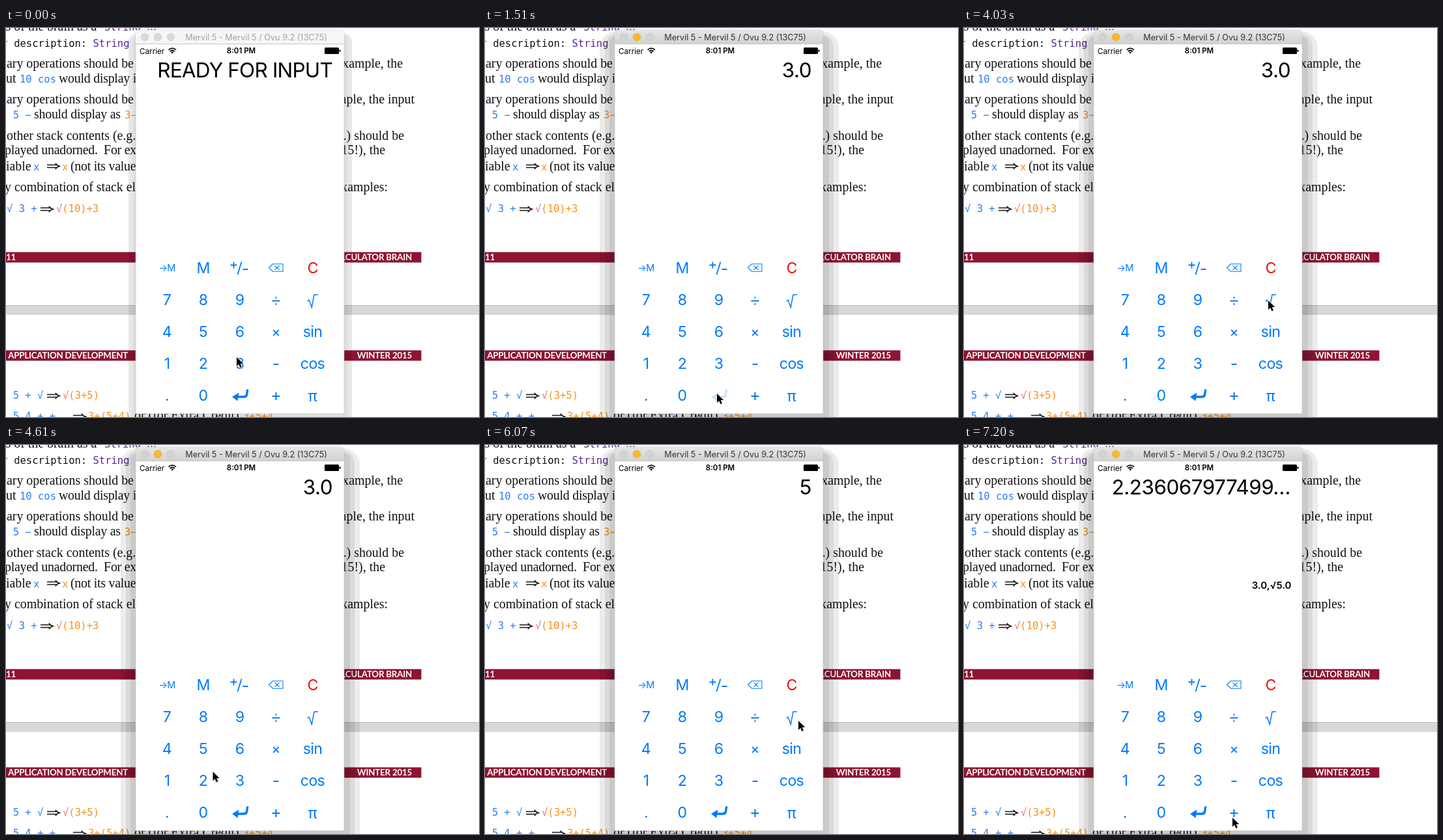
Recreate the animation shown at these times as an HTML page. Size 726 by 598 pixels, loop 8 s.

```html
<!DOCTYPE html>
<html lang="en">
<head>
<meta charset="utf-8">
<title>Calculator demo</title>
<style>
html, body { margin: 0; width: 100%; height: 100%; overflow: hidden; background: #fff; }
svg { display: block; width: 726px; height: 598px; }
text { white-space: pre; }

.page { font: 19.9px "Liberation Serif", serif; fill: #111; }
.code { font: 15.5px "DejaVu Sans Mono", monospace; }
.blue { fill: #2f7bf6; }
.orange { fill: #fb9017; }
.salmon { fill: #f0705a; }
.type { fill: #5c2699; }
.key { fill: #aa2b95; }
.end { text-anchor: end; }
.tight { letter-spacing: -.25px; }
.bar { fill: #8e1432; }
.head { font: 700 13.3px Lato, sans-serif; fill: #fff; letter-spacing: -.2px; }

.ui { font-family: Inter, sans-serif; }
.title { font-size: 12.7px; text-anchor: middle; }
.big { font-size: 31.5px; letter-spacing: -.55px; text-anchor: end; }
.keys { font-size: 23.2px; letter-spacing: -.7px; text-anchor: middle; fill: #007aff; }
.line { fill: none; stroke: #007aff; }

/* one loop is 8 s, so 1% is 80 ms */
.anim { animation: 8s step-end infinite; }
.idle, .t1 { opacity: 1; }
.live, .t2, .t3, .t4, .t5 { opacity: 0; }
.idle { animation-name: idle; }
.live { animation-name: live; }
@keyframes idle { 0% { opacity: 1 } 9%, 100% { opacity: 0 } }
@keyframes live { 0% { opacity: 0 } 9%, 100% { opacity: 1 } }

.t1 { animation-name: t1; letter-spacing: -.8px; }
.t2 { animation-name: t2; }
.t3 { animation-name: t3; }
.t4 { animation-name: t4; }
.t5 { animation-name: t5; }
@keyframes t1 { 0% { opacity: 1 } 10.5%, 100% { opacity: 0 } }
@keyframes t2 { 0% { opacity: 0 } 10.5% { opacity: 1 } 18.125%, 100% { opacity: 0 } }
@keyframes t3 { 0% { opacity: 0 } 18.125% { opacity: 1 } 65.125%, 100% { opacity: 0 } }
@keyframes t4 { 0% { opacity: 0 } 65.125% { opacity: 1 } 79.625%, 100% { opacity: 0 } }
@keyframes t5 { 0% { opacity: 0 } 79.625%, 100% { opacity: 1 } }

/* a pressed key dims at once and fades back after release */
.three { animation-name: three; }
.enter { animation-name: enter; }
.five { animation-name: five; }
.root { animation-name: root; }
@keyframes three {
  0% { opacity: 1 }
  9% { opacity: .2 }
  10.5% { opacity: .2; animation-timing-function: steps(7, start) }
  15.75%, 100% { opacity: 1 }
}
@keyframes enter {
  0% { opacity: 1 }
  17.375% { opacity: .2 }
  19.625% { opacity: .2; animation-timing-function: steps(7, start) }
  24.875%, 100% { opacity: 1 }
}
@keyframes five {
  0% { opacity: 1 }
  62.125% { opacity: .2 }
  65.125% { opacity: .2; animation-timing-function: steps(7, start) }
  70.375%, 100% { opacity: 1 }
}
@keyframes root {
  0% { opacity: 1 }
  78.125% { opacity: .2 }
  79.625% { opacity: .2; animation-timing-function: steps(6, start) }
  84.125%, 100% { opacity: 1 }
}

.cursor { animation-name: cursor; }
@keyframes cursor {
  0% { transform: translate(353px, 505px) }
  .75% { transform: translate(353px, 505px); animation-timing-function: steps(5, start) }
  5.44% { transform: translate(351px, 525px) }
  12% { transform: translate(351px, 525px); animation-timing-function: steps(5, start) }
  15.875% { transform: translate(355px, 561px) }
  19.625% { transform: translate(355px, 561px); animation-timing-function: steps(2, start) }
  21.125% { transform: translate(359px, 566px); animation-timing-function: steps(4, start) }
  24.125% { transform: translate(405px, 500px); animation-timing-function: steps(5, start) }
  27.875% { transform: translate(467px, 419px); animation-timing-function: steps(4, start) }
  30.875% { transform: translate(477px, 409px) }
  50.375% { transform: translate(466px, 418px) }
  51.125% { transform: translate(466px, 418px); animation-timing-function: steps(5, start) }
  54.875% { transform: translate(392px, 478px); animation-timing-function: steps(4, start) }
  57.625% { transform: translate(322px, 512px); animation-timing-function: steps(4, start) }
  60.625% { transform: translate(300px, 469px); animation-timing-function: steps(2, start) }
  62.125% { transform: translate(302px, 466px) }
  67.375% { transform: translate(302px, 466px); animation-timing-function: steps(4, start) }
  70.375% { transform: translate(362px, 482px); animation-timing-function: steps(6, start) }
  75.125% { transform: translate(483px, 431px); animation-timing-function: steps(2, start) }
  76.625% { transform: translate(480px, 423px); animation-timing-function: steps(2, start) }
  78.125% { transform: translate(470px, 420px) }
  81.125% { transform: translate(470px, 420px); animation-timing-function: steps(6, start) }
  85.625% { transform: translate(398px, 559px); animation-timing-function: steps(3, start) }
  87.7% { transform: translate(409px, 570px) }
  89.25% { transform: translate(409px, 570px); animation-timing-function: steps(2, start) }
  90.75%, 100% { transform: translate(411px, 572px) }
}
</style>
</head>
<body>
<svg viewBox="0 0 726 598" xmlns="http://www.w3.org/2000/svg">
  <defs>
    <path id="implies" d="M0-2.4H15.5M0 1.4H15.5M12.8-5Q15-1.6 19-.5Q15 .6 12.8 4" fill="none" stroke="#111" stroke-width="1.5"/>
    <linearGradient id="chrome" x2="0" y2="1">
      <stop stop-color="#e6e6e6"/>
      <stop offset="1" stop-color="#d1d1d1"/>
    </linearGradient>
  </defs>

  <!-- document behind the window -->
  <rect width="726" height="598" fill="#fff"/>
  <path d="M0 426H726V441H0Z" fill="#d8d8d8"/>
  <path d="M0 426.5H726" stroke="#b8b8b8"/>
  <g class="page">
    <text x="-6" y="4">ts of the brain as a <tspan x="151" class="code type">String</tspan><tspan x="211"> ...</tspan></text>
    <text x="-6.5" y="29" class="code"><tspan class="key">r</tspan> description: <tspan class="type">String</tspan></text>
    <text x="-9" y="61">nary operations should be displayed</text>
    <text x="609" y="61" class="end">example, the</text>
    <text x="0" y="84">ut <tspan x="21" class="code blue">10 cos</tspan><tspan x="81" class="tight">would display in</tspan></text>
    <text x="-9" y="116">nary operations should be displayed</text>
    <text x="627" y="116" class="end">example, the input</text>
    <text y="139"><tspan x="-8" class="code blue">3 5 −</tspan><tspan x="43" class="tight">should display as</tspan><tspan x="182" class="code orange">3−5</tspan></text>
    <text x="1" y="172">other stack contents (e.g. values</text>
    <text x="611" y="172" class="end">.) should be</text>
    <text x="-2" y="194" class="tight">played unadorned.  For example</text>
    <text x="582" y="194" class="end">15!), the</text>
    <text x="0" y="219">iable <tspan x="42" class="code blue">x</tspan><tspan x="86" class="code orange">x</tspan><tspan x="99" class="tight">(not its value</tspan></text>
    <use href="#implies" x="63" y="213"/>
    <text x="-2" y="251">y combination of stack elements</text>
    <text x="586" y="251" class="end">examples:</text>
    <text y="283" class="code"><tspan x="1" class="blue">√ 3 +</tspan><tspan x="77" class="salmon">√</tspan><tspan class="orange">(10)+3</tspan></text>
    <use href="#implies" x="53" y="279"/>
    <text y="570" class="code"><tspan x="-8" class="blue">3 5 + √</tspan><tspan x="87" class="salmon">√</tspan><tspan class="orange">(3+5)</tspan></text>
    <use href="#implies" x="63" y="566"/>
    <text y="602"><tspan x="-8" class="code blue">3 5 4 + +</tspan><tspan x="126" class="code orange">3+(5+4)</tspan><tspan x="197">or (for Extra Credit)</tspan><tspan x="364" class="code orange">3+5+4</tspan></text>
    <use href="#implies" x="103" y="598"/>
  </g>
  <path class="bar" d="M0 344.5H637.5V360.5H0ZM0 495.5H637.5V511.5H0Z"/>
  <g class="head">
    <text x="0" y="357">11</text>
    <text x="623" y="357" class="end">CALCULATOR BRAIN</text>
    <text x="187" y="508" class="end">U APPLICATION DEVELOPMENT</text>
    <text x="623" y="508" class="end">WINTER 2015</text>
  </g>

  <!-- window shadow -->
  <g class="anim idle" fill="#000" fill-opacity=".09">
    <rect x="188" y="8" width="343" height="640" rx="14"/>
    <rect x="194" y="12" width="331" height="640" rx="8" fill-opacity=".04"/>
  </g>
  <g class="anim live" fill="#000" fill-opacity=".075">
    <rect x="176" y="5" width="367" height="640" rx="26"/>
    <rect x="184" y="9" width="351" height="640" rx="19"/>
    <rect x="191" y="12" width="337" height="640" rx="11"/>
  </g>

  <!-- window -->
  <path d="M199 593V8Q199 3 204 3H514Q519 3 519 8V593Z" fill="#fff" stroke="#b8b8b8" stroke-width=".6"/>
  <g class="ui">
    <g class="anim idle">
      <path d="M199 25V8Q199 3 204 3H514Q519 3 519 8V25Z" fill="#f6f6f6"/>
      <g fill="#dadada" stroke="#cacaca" stroke-width=".7">
        <circle cx="213" cy="14" r="5.7"/><circle cx="233" cy="14" r="5.7"/><circle cx="253" cy="14" r="5.7"/>
      </g>
      <text class="title" x="384" y="19" fill="#a2a2a2">Mervil 5 - Mervil 5 / Ovu 9.2 (13C75)</text>
    </g>
    <g class="anim live">
      <path d="M199 25V8Q199 3 204 3H514Q519 3 519 8V25Z" fill="url(#chrome)"/>
      <g fill="#d3d3d3" stroke="#c2c2c2" stroke-width=".7">
        <circle cx="213" cy="14" r="5.7"/><circle cx="253" cy="14" r="5.7"/>
        <circle cx="233" cy="14" r="5.7" fill="#fdb924" stroke="#e0a12a"/>
      </g>
      <text class="title" x="384" y="19" fill="#333">Mervil 5 - Mervil 5 / Ovu 9.2 (13C75)</text>
    </g>
    <path d="M199 24.5H519" stroke="#c6c6c6"/>

    <!-- status bar -->
    <text x="205" y="39.5" font-size="11.7">Carrier</text>
    <g fill="none" stroke="#000" stroke-width="1.7">
      <path d="M249.5 33.6Q255.2 28.8 261 33.6M251.7 36Q255.2 33 258.8 36"/>
      <path d="M253.3 37.4L255.2 39.6L257.2 37.4Q255.2 35.8 253.3 37.4Z" fill="#000" stroke="none"/>
    </g>
    <text x="361" y="39.3" font-size="11.5" font-weight="600" text-anchor="middle">8:01 PM</text>
    <rect x="489" y="30" width="22" height="10" rx="1.5"/>
    <rect x="511.5" y="33.2" width="2" height="3.6" rx="1"/>

    <!-- display -->
    <g class="big">
      <text class="anim t1" x="501" y="76">READY FOR INPUT</text>
      <text class="anim t2" x="501" y="76">3</text>
      <text class="anim t3" x="501" y="76">3.0</text>
      <text class="anim t4" x="501" y="76">5</text>
      <text class="anim t5" x="501" y="76">2.236067977499…</text>
    </g>
    <text class="anim t5 end" x="502.5" y="221" font-size="15" font-weight="600">3.0,√5.0</text>

    <!-- keypad -->
    <g class="keys">
      <text x="247" y="374" font-size="14.5">→M</text>
      <text x="302.5" y="377">M</text>
      <path class="line" d="M344.5 364.5H354.5M349.5 359.5V369.5M355.5 379L361.5 359.5M363.5 371H371.5" stroke-width="1.8"/>
      <path class="line" d="M403.5 368.5L409.5 362.8H425V374.2H409.5ZM412.5 365.2L419.8 371.8M419.8 365.2L412.5 371.8" stroke-width="1.1"/>
      <text x="470.5" y="377" fill="#f00b0b">C</text>

      <text x="247" y="426">7</text>
      <text x="302.5" y="426">8</text>
      <text x="358.5" y="426">9</text>
      <path class="line" d="M408.5 419.5H420.5M414.5 413.3V415.7M414.5 423.3V425.7" stroke-width="2"/>
      <path class="line anim root" d="M462.5 419.8L465.2 418.3L469.3 429.5L473 410H479" stroke-width="1.5"/>

      <text x="247" y="475">4</text>
      <text class="anim five" x="302.5" y="475">5</text>
      <text x="358.5" y="475">6</text>
      <path class="line" d="M410.2 464.2L418.8 472.8M418.8 464.2L410.2 472.8" stroke-width="1.9"/>
      <text x="470.5" y="475">sin</text>

      <text x="247" y="524">1</text>
      <text x="302.5" y="524">2</text>
      <text class="anim three" x="358.5" y="524">3</text>
      <path class="line" d="M410.5 517H418.5" stroke-width="2"/>
      <text x="470.5" y="524">cos</text>

      <text x="247" y="573">.</text>
      <text x="302.5" y="573">0</text>
      <path class="anim enter" d="M347 567L357.5 560.5L356.7 565.2H365Q367.6 565.2 368 562.8L369 555.5H372.4L371.3 563.8Q370.5 568.8 365.5 568.8H356.2L355.5 573.5Z"/>
      <path class="line" d="M408.5 566H420.5M414.5 560V572" stroke-width="2.1"/>
      <text x="470.5" y="574">π</text>
    </g>
  </g>

  <g class="anim cursor">
    <path d="M1 1V15L4.2 12L6.4 17.2L8.9 16.1L6.7 11H11.2Z" fill="#000" stroke="#fff" stroke-width="1.6" paint-order="stroke"/>
  </g>
</svg>
</body>
</html>
```
